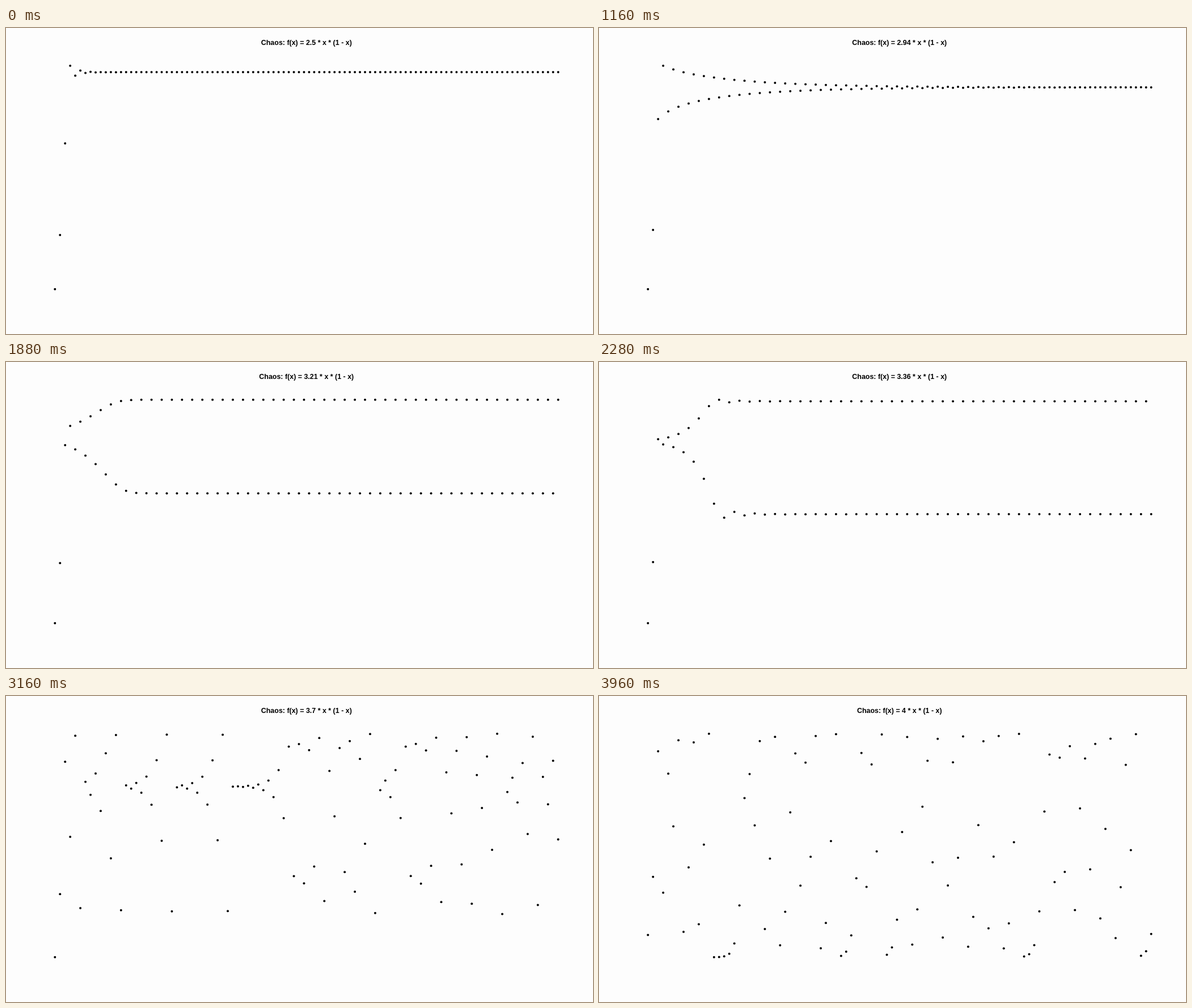
These frames come from a looping animation (1035x541 px, 4000 ms). An HTML page:

```html
<!DOCTYPE html>
<html lang="en">
<head>
<meta charset="utf-8">
<title>Logistic map</title>
<style>
  html, body { margin: 0; width: 100%; height: 100%; overflow: hidden; background: #fdfdfd; }
  svg { display: block; width: 1035px; height: 541px; }
  text { font: bold 12.45px "Liberation Sans", Arial, sans-serif; font-kerning: none; text-anchor: middle; }
</style>
</head>
<body>
<svg viewBox="0 0 1035 541">
  <text id="title" x="529.8" y="30.3"></text>
  <g id="dots"></g>
</svg>
<script>
const STEPS = 100, STEP_MS = 40, POINTS = 100;
const LEFT = 86.3, RIGHT = 973.6, TOP = 66.8, BOTTOM = 461.8;
const title = document.getElementById("title");
const group = document.getElementById("dots");

const dots = Array.from({ length: POINTS }, (_, i) => {
  const dot = document.createElementNS("http://www.w3.org/2000/svg", "circle");
  dot.setAttribute("cx", LEFT + (RIGHT - LEFT) * i / (POINTS - 1));
  dot.setAttribute("r", 2);
  return group.appendChild(dot);
});

function orbit(r) {
  const xs = [0.1];
  while (xs.length < POINTS) {
    const x = xs[xs.length - 1];
    xs.push(r * x * (1 - x));
  }
  return xs;
}

function draw(step) {
  const r = 2.5 + step * (1.5 / (STEPS - 1));
  const xs = orbit(r);
  const min = Math.min(...xs), max = Math.max(...xs);
  title.textContent = `Chaos: f(x) = ${+r.toFixed(2)} * x * (1 - x)`;
  // The vertical axis always fits the whole orbit
  xs.forEach((x, i) =>
    dots[i].setAttribute("cy", BOTTOM - (BOTTOM - TOP) * (x - min) / (max - min)));
}

let shown = 0;
const start = performance.now();
function tick(now) {
  const step = Math.floor(Math.max(0, now - start) / STEP_MS) % STEPS;
  if (step !== shown) draw(shown = step);
  requestAnimationFrame(tick);
}
draw(0);
requestAnimationFrame(tick);
</script>
</body>
</html>
```
